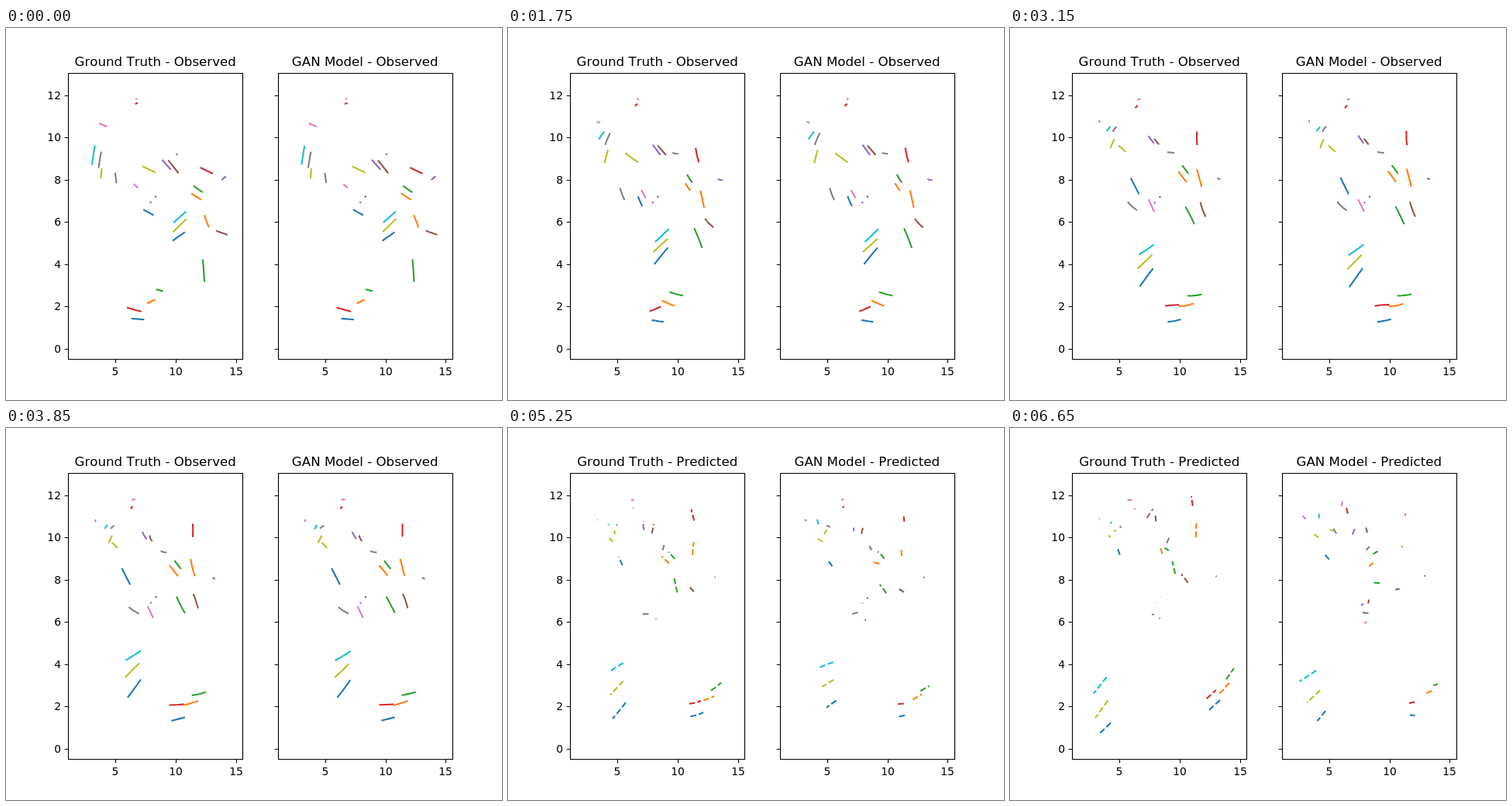
Recreate the animation shown at these times as an HTML page. Size 640 px wide and 480 px high, loop 7000 ms.

```html
<!DOCTYPE html>
<html lang="en">
<head>
<meta charset="utf-8">
<title>Trajectories</title>
<style>
  html, body { margin: 0; width: 100%; height: 100%; overflow: hidden; background: #fff; }
  svg { display: block; width: 640px; height: 480px; }
  text { font-family: "DejaVu Sans", sans-serif; font-size: 13.89px; font-kerning: none; }
  .title { font-size: 16.67px; text-anchor: middle; }
  .axis { fill: none; stroke: #000; stroke-width: 1.11; }
  .track { fill: none; stroke-width: 2.083; stroke-linejoin: round; }
  .solid .track { stroke-linecap: square; }
  .dashed .track { stroke-dasharray: 7.71 3.33; }
</style>
</head>
<body>
<svg id="stage" viewBox="0 0 640 480"></svg>
<script>
const STEP = 350, STEPS = 20, SPLIT = 12, SPAN = 3, SHIFT = 270.55;
const KEYS = [0, 4, 9, 14, 18, 22];   // steps at which a walker's place is given
const SHARED = 8;                     // coordinates both panels have in common
const COLORS = {
  blue: '#1f77b4', orange: '#ff7f0e', green: '#2ca02c', red: '#d62728', purple: '#9467bd',
  brown: '#8c564b', pink: '#e377c2', gray: '#7f7f7f', olive: '#bcbd22', cyan: '#17becf'
};
const stage = document.getElementById('stage');

function add(parent, tag, attrs, text) {
  const el = document.createElementNS('http://www.w3.org/2000/svg', tag);
  for (const key in attrs) el.setAttribute(key, attrs[key]);
  if (text !== undefined) el.textContent = text;
  parent.appendChild(el);
  return el;
}

// Smooth cubic curve through the key values.
function spline(v, t) {
  const last = KEYS.length - 1;
  const slope = k => {
    const a = Math.max(k - 1, 0), b = Math.min(k + 1, last);
    return (v[b] - v[a]) / (KEYS[b] - KEYS[a]);
  };
  let i = 0;
  while (i < last - 1 && t > KEYS[i + 1]) i++;
  const h = KEYS[i + 1] - KEYS[i], u = (t - KEYS[i]) / h, w = 1 - u;
  return w * w * ((1 + 2 * u) * v[i] + u * h * slope(i)) +
         u * u * ((3 - 2 * u) * v[i + 1] - w * h * slope(i + 1));
}

function panel(name, shift, left, right, labelled) {
  const lines = add(stage, 'g', { transform: `translate(${shift} 0)` });
  let d = `M${left} 58.5H${right}V427.5H${left}Z`;
  for (let v = 5; v <= 15; v += 5) {
    const x = Math.floor(64.3 + 15.52 * v + shift);
    d += `M${x + 0.5} 427.5v4.86`;
    add(stage, 'text', { x, y: 448, 'text-anchor': 'middle' }, v);
  }
  for (let v = 0; v <= 12; v += 2) {
    const y = Math.floor(414 - 27.25 * v);
    d += `M${left} ${y + 0.5}h-4.86`;
    if (labelled) add(stage, 'text', { x: 71, y: y + 5, 'text-anchor': 'end' }, v);
  }
  add(stage, 'path', { class: 'axis', d });
  const title = add(stage, 'text', { class: 'title', x: 192.7 + shift, y: 49 });
  return { name, lines, title, walkers: [] };
}

const truth = panel('Ground Truth', 0, 80.5, 305.5, true);
const model = panel('GAN Model', SHIFT, 351.5, 576.5, false);

// A walker's key places, and where the model expects it at the last two keys.
function walk(color, path, guess) {
  const enter = (p, xy) => p.walkers.push({
    line: add(p.lines, 'polyline', { class: 'track', stroke: COLORS[color] }),
    xs: xy.filter((_, i) => i % 2 === 0),
    ys: xy.filter((_, i) => i % 2 === 1)
  });
  enter(truth, path);
  enter(model, path.slice(0, SHARED).concat(guess));
}

// Someone standing almost still, whom the model lets drift away.
function stand(color, x, y, dx, dy) {
  walk(color, KEYS.flatMap((_, i) => [x + 0.2 * i, y + 0.2 * i]), [x, y + 0.3 * dy, x + dx, y + dy]);
}

// Walking right along the bottom
walk('blue', [163, 375, 182, 376.5, 204.5, 379, 230, 373.5, 252, 367, 271, 351], [243, 370.5, 252, 371]);
walk('orange', [183, 355, 195, 351, 219, 359, 247, 352.5, 266, 346, 283, 329], [263.5, 343.5, 274.5, 339]);
walk('green', [194.5, 337.5, 205, 340, 230, 345.5, 257, 341, 275, 328.5, 289, 310], [273, 333, 281.5, 330.5]);
walk('red', [157, 361, 179, 366, 201, 358.5, 228.5, 356.5, 249, 352, 266, 338], [241.5, 355.5, 252, 353.5]);

// Crossing to the lower left
walk('blue', [230, 264, 211, 278.5, 184, 311, 157.5, 347, 135, 375, 115.5, 394.5], [140.5, 361, 126, 378]);
walk('olive', [232, 247, 211, 267.5, 182.5, 293.5, 154.5, 321, 132, 344.5, 110, 374], [135, 334, 112.5, 354.5]);
walk('cyan', [231.5, 237.5, 212, 255, 185, 280, 155, 299.5, 130.5, 315.5, 108, 342.5], [131.5, 309, 103, 327]);

// Heading up on the right
walk('green', [256, 326.5, 252.5, 291, 237.5, 252, 220.5, 218.5, 214.5, 194, 209.5, 172], [209, 202, 199, 199.5]);
walk('orange', [261.5, 256.5, 254.5, 237, 247, 204, 238.5, 170, 239.5, 147, 240.5, 123], [236.5, 155.5, 234.5, 152.5]);
walk('brown', [285, 266.5, 268, 259.5, 252, 242.5, 242, 215, 232.5, 203, 221, 188.5], [234, 208, 226.5, 208.5]);
walk('purple', [283, 192, 277.5, 196, 270.5, 195, 267.5, 193.5, 267, 192, 265.5, 191], [265.5, 192, 264, 190]);
walk('red', [266, 187.5, 248.5, 177, 241.5, 150, 241, 124.5, 236.5, 105, 234, 88], [240, 114, 239, 111]);

// Upper middle, drifting up and left
walk('green', [253, 211.5, 239.5, 201.5, 229.5, 187, 218, 172, 207, 160, 199.5, 154.5], [206.5, 159.5, 198, 162.5]);
walk('orange', [251, 221, 237, 211.5, 227, 198, 211.5, 178, 198.5, 165.5, 193.5, 153], [200.5, 173.5, 192.5, 178.5]);
walk('brown', [222, 186.5, 206.5, 167, 191.5, 149.5, 185.5, 139.5, 188, 124, 187.5, 111], [188, 128, 190.5, 135]);
walk('purple', [212, 182, 199, 167, 185, 148, 176.5, 135, 175, 120, 184.5, 104.5], [175, 129, 171, 138]);
walk('olive', [192, 186, 172, 176, 148.5, 159, 137.5, 148.5, 130.5, 142, 127, 138.5], [129.5, 143, 122, 137]);
walk('gray', [220.5, 163, 220, 162.5, 211, 161, 200.5, 159, 201.5, 151, 205.5, 141], [195, 152.5, 189, 157.5]);

// Upper left and top
walk('olive', [122.5, 193, 124, 178, 130, 154, 136.5, 139.5, 137.5, 132.5, 134, 133], [141, 131.5, 147, 133]);
walk('gray', [119.5, 179.5, 124, 155, 133, 133, 139, 126.5, 141.5, 125.5, 143, 129], [145, 128, 151.5, 137.5]);
walk('cyan', [111, 175.5, 116, 147, 125.5, 132.5, 130, 126, 129.5, 124, 131, 121], [128.5, 118, 128, 110.5]);
walk('pink', [129.5, 127, 119, 122.5, 115.5, 121, 115.5, 119, 115.5, 118, 115.5, 116.5], [112, 118.5, 107, 113]);
walk('pink', [168.5, 91.5, 168, 91.5, 167, 92, 163.5, 92.5, 159, 93, 151.5, 93], [159.5, 93, 157, 101]);
walk('red', [169, 97, 167, 98, 164, 100.5, 161.5, 103.5, 161.5, 103.5, 161, 104.5], [163, 101.5, 165.5, 111]);

// Centre left
walk('gray', [141, 188, 143.5, 203, 152.5, 225, 170.5, 239, 181.5, 240, 186, 241], [181.5, 238, 192.5, 239]);
walk('pink', [165.5, 202, 171, 207.5, 179, 222, 189.5, 244, 191.5, 246, 194, 245], [190, 249, 186.5, 252]);
walk('blue', [189.5, 241, 175, 232, 166, 213.5, 150, 182, 143, 166.5, 139, 156], [143, 172, 135.5, 163]);
stand('purple', 186.5, 225, -4, 4);
stand('brown', 193, 217.5, -1.5, 9);

function draw(step) {
  const seen = step < SPLIT;
  for (const p of [truth, model]) {
    p.title.textContent = p.name + (seen ? ' - Observed' : ' - Predicted');
    p.lines.setAttribute('class', seen ? 'solid' : 'dashed');
    for (const { line, xs, ys } of p.walkers) {
      const pts = [];
      for (let t = step; t <= step + SPAN; t++) {
        pts.push(spline(xs, t).toFixed(2) + ',' + spline(ys, t).toFixed(2));
      }
      line.setAttribute('points', pts.join(' '));
    }
  }
}

let shown = -1;
function tick() {
  const step = Math.floor(performance.now() / STEP) % STEPS;
  if (step !== shown) draw(shown = step);
  requestAnimationFrame(tick);
}
tick();
</script>
</body>
</html>
```
